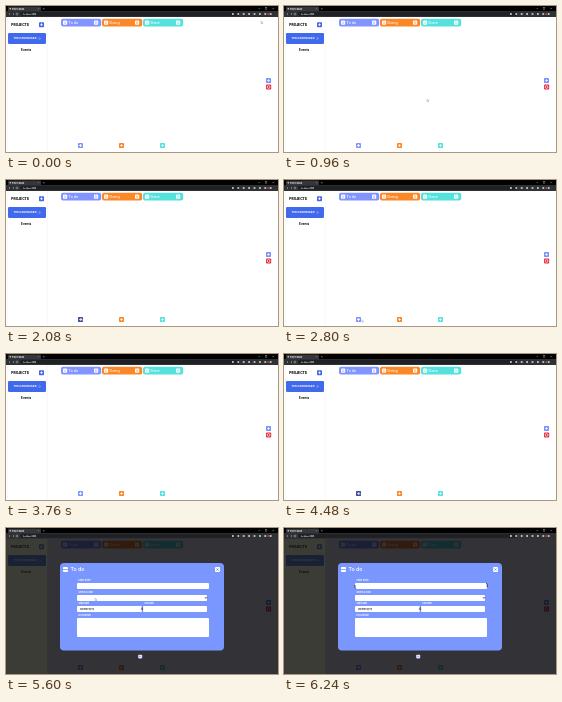
Animation, 272 px wide and 146 px high, one loop 8 s. Source, as an HTML page:

```html
<!DOCTYPE html>
<html lang="en">
<head>
<meta charset="utf-8">
<title>Project board</title>
<style>
  html, body { margin: 0; width: 100%; height: 100%; overflow: hidden; background: #fff; }
  svg { display: block; width: 100vw; height: 100vh; }
  text { font-family: Inter, Roboto, sans-serif; }
  .timed { animation: 8s step-end infinite; }

  #cursor { animation-name: travel; }
  #add-hover { animation-name: hover; }
  #dialog { animation-name: open; }
  #focus { animation-name: focus; }

  /* Pointer positions are held between sampled moves. */
  @keyframes travel {
    0%    { transform: translate(255px, 15px); opacity: 1; }
    1%    { transform: translate(246px, 20px); }
    2%    { transform: translate(232px, 29px); }
    3%    { transform: translate(218px, 38px); }
    6%    { transform: translate(202px, 53px); }
    12%   { transform: translate(143px, 93px); }
    17%   { transform: translate(74px, 139px); }
    19%   { transform: translate(74px, 140px); }
    26%   { transform: translate(75px, 138px); }
    35%   { transform: translate(77.5px, 139.5px); }
    37%   { transform: translate(157.5px, 102px); }
    41%   { transform: translate(158px, 102px); }
    44%   { transform: translate(182.5px, 83px); opacity: 1; }
    47%   { transform: translate(182.5px, 83px); opacity: 0; }
    50%   { transform: translate(176px, 90px); opacity: 1; }
    51%   { transform: translate(110px, 120px); }
    52%   { transform: translate(76px, 133px); }
    54%   { transform: translate(75px, 137px); }
    56%   { transform: translate(74.5px, 138px); }
    64%   { transform: translate(74.5px, 134px); }
    66%   { transform: translate(76.5px, 129.5px); }
    69%   { transform: translate(89px, 72px); }
    70%   { transform: translate(89px, 70px); opacity: 1; }
    72%, 100% { transform: translate(89px, 57px); opacity: 0; }
  }
  @keyframes hover {
    0%  { opacity: 0; }
    19% { opacity: 1; }
    35% { opacity: 0; }
    54% { opacity: 1; }
    66%, 100% { opacity: 0; }
  }
  @keyframes open {
    0% { visibility: hidden; }
    61%, 100% { visibility: visible; }
  }
  @keyframes focus {
    0% { opacity: 0; }
    72%, 100% { opacity: 1; }
  }
</style>
</head>
<body>
<svg viewBox="0 0 272 146" preserveAspectRatio="none">
  <defs>
    <g id="plus">
      <rect width="5" height="5" rx=".8"/>
      <path d="M2.5 1.2v2.6M1.2 2.5h2.6" stroke="#fff" stroke-width=".8"/>
    </g>
    <g id="trash" fill="#fff">
      <rect width="4.2" height="4.4" rx=".8"/>
      <path d="M1 1.4h2.2M1.5 1.8v1.6h1.2V1.8" fill="none" stroke="currentColor" stroke-width=".4"/>
    </g>
  </defs>

  <rect width="272" height="146" fill="#fff"/>

  <g id="sidebar">
    <path d="M1.3 11v135M41.3 11v135" stroke="#f0f1f4" stroke-width=".6"/>
    <text x="5.3" y="19.6" font-size="3.3" font-weight="800" fill="#000">PROJECTS</text>
    <use href="#plus" x="33" y="16.2" fill="#4567e5"/>
    <rect x="2" y="27" width="38" height="11" rx="1.2" fill="#4169eb"/>
    <text x="7.5" y="33.4" font-size="2.7" font-weight="700" fill="#fff">THE DASHBOARD</text>
    <path d="M33 31.4l1.1 1.1-1.1 1.1" fill="none" stroke="#fff" stroke-width=".6"/>
    <text x="15" y="45.1" font-size="3.1" font-weight="700" fill="#000">Events</text>
  </g>

  <g id="columns"></g>

  <rect id="add-hover" class="timed" x="72" y="137" width="5" height="5" rx=".8" fill="#303f86" fill-opacity=".8"/>
  <path d="M74.5 138.2v2.6M73.2 139.5h2.6" stroke="#fff" stroke-width=".8"/>

  <g id="side-actions">
    <use href="#plus" x="260" y="72" fill="#7b91fb"/>
    <rect x="260" y="78.4" width="5.2" height="5.2" rx="1" fill="#e5263b"/>
    <circle cx="262.6" cy="81" r="1.4" fill="none" stroke="#fff" stroke-width=".7"/>
  </g>

  <g id="dialog" class="timed">
    <rect y="11" width="272" height="135" fill="#000005" fill-opacity=".8"/>
    <rect y="11" width="41.3" height="135" fill="#8c8830" fill-opacity=".1"/>
    <rect x="54" y="35" width="164" height="87.5" rx="4" fill="#7a96ff"/>
    <rect x="57" y="39" width="5" height="5" rx="1" fill="#fff"/>
    <path d="M57 41.5h5" stroke="#7a96ff" stroke-width=".8"/>
    <text x="64.5" y="43.3" font-size="5.2" font-weight="600" fill="#fff">To do</text>
    <rect x="209" y="39" width="5" height="5" rx="1" fill="#fff"/>
    <path d="M210.4 40.4l2.2 2.2m0-2.2l-2.2 2.2" stroke="#566ccc" stroke-width=".6"/>
    <g id="fields" fill="#fff"></g>
    <path d="M199 69.3l1 1 1-1" fill="none" stroke="#000" stroke-width=".8"/>
    <text x="74" y="82" font-size="2.3" font-weight="600" fill="#24262c">dd/mm/yyyy</text>
    <path d="M135.4 79.8h1.3v2h-1.3z" fill="none" stroke="#24262c" stroke-width=".5"/>
    <rect x="132.2" y="126.8" width="4" height="3.6" rx=".8" fill="#dfe5ff"/>
    <path d="M133.2 128.6h2" stroke="#7a96ff" stroke-width=".7"/>
    <path id="focus" class="timed" d="M71 57v2.4q0 1.2 1.2 1.2M202 55.4q1.2 0 1.2 1.2v2.6" fill="none" stroke="#10131f" stroke-width=".7"/>
  </g>

  <g id="chrome">
    <rect width="272" height="5" fill="#020203"/>
    <path d="M2 5V1.5q0-1 1-1h31q1 0 1 1V5z" fill="#35363a"/>
    <circle cx="4.3" cy="2.8" r=".8" fill="#ddd"/>
    <text x="6" y="3.5" font-size="1.9" font-weight="600" fill="#fff">Project board</text>
    <path d="M32 2.2l1 1m0-1l-1 1M37 2.7h1.6M37.8 1.9v1.6" stroke="#bbb" stroke-width=".35"/>
    <path d="M252.5 2.5h1.6M266.5 1.8l1.4 1.4m0-1.4l-1.4 1.4" stroke="#ccc" stroke-width=".35"/>
    <rect x="259.5" y="1.8" width="1.4" height="1.4" fill="none" stroke="#ccc" stroke-width=".3"/>
    <rect y="5" width="272" height="6" fill="#303135"/>
    <rect x="14" y="5.8" width="220" height="4.2" rx="2.1" fill="#202124"/>
    <path d="M4 7l-1 1 1 1M7 7l1 1-1 1" fill="none" stroke="#ccc" stroke-width=".45"/>
    <circle cx="11" cy="8" r="1" fill="none" stroke="#ccc" stroke-width=".45"/>
    <text x="17" y="8.6" font-size="1.8" font-weight="600" fill="#fff">localhost:3000</text>
    <path d="M226 8h43" stroke="#e4e5e8" stroke-width="1.3" stroke-dasharray="1.8 3.6"/>
    <circle cx="262.5" cy="8" r="1.1" fill="#a84c3e"/>
  </g>

  <g id="cursor" class="timed">
    <path d="M0 0v2.6l.7-.6.5 1 .5-.2-.5-1h.8z" fill="#fff" stroke="#555a66" stroke-width=".25"/>
  </g>
</svg>
<script>
  const columns = [
    { x: 55, color: "#8295ff", name: "To do" },
    { x: 96, color: "#fa8728", name: "Doing" },
    { x: 137, color: "#55e1dc", name: "Done" }
  ];
  document.querySelector("#columns").innerHTML = columns.map(({ x, color, name }) => `
    <rect x="${x}" y="12.7" width="40.2" height="7.9" rx="2" fill="${color}"/>
    <rect x="${x + 2}" y="14.5" width="4.2" height="4.2" rx="1" fill="#fff"/>
    <path d="M${x + 3} 16h2.2m-2.2 1.4h2.2" stroke="${color}" stroke-width=".4"/>
    <text x="${x + 7.6}" y="17.9" font-size="3.6" font-weight="500" fill="#fff">${name}</text>
    <use href="#trash" x="${x + 33}" y="14.4" color="${color}"/>
    <use href="#plus" x="${x + 17}" y="137" fill="${color}"/>`).join("");

  const fields = [
    { x: 71, y: 55, w: 132, h: 6, label: "Enter a title" },
    { x: 71, y: 67, w: 130, h: 6, label: "Select a color" },
    { x: 71, y: 78, w: 65, h: 6, label: "Start date" },
    { x: 137, y: 78, w: 64, h: 6, label: "End date" },
    { x: 71, y: 90, w: 132, h: 19, label: "Description" }
  ];
  document.querySelector("#fields").innerHTML = fields.map(({ x, y, w, h, label }) => `
    <text x="${x + 1.6}" y="${y - 2.2}" font-size="2.2" font-weight="700">${label}</text>
    <rect x="${x}" y="${y}" width="${w}" height="${h}" rx="1"/>`).join("");
</script>
</body>
</html>
```
